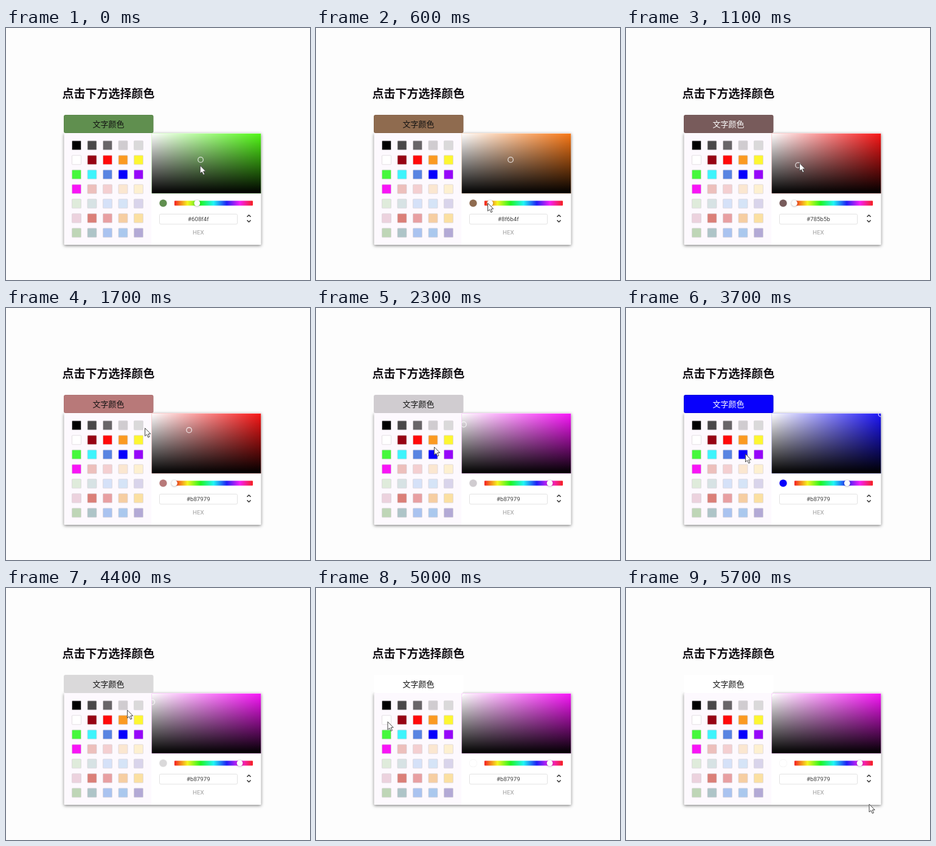
Recreate the animation shown at these times as an HTML page with a canvas. Size 500 by 415 pixels, loop 5800 ms.

```html
<!DOCTYPE html>
<html lang="zh-CN">
<head>
<meta charset="utf-8">
<style>
html, body { margin: 0; width: 100%; height: 100%; overflow: hidden; background: #fdfdfd; }
canvas { display: block; }
</style>
</head>
<body>
<canvas id="stage" width="500" height="415"></canvas>
<script>
const ctx = document.getElementById('stage').getContext('2d');
const LOOP = 5800, STEP = 100, HOLD = 100, LEAD = 40;
const CJK = '"Noto Sans CJK SC", "Noto Sans CJK", sans-serif';
const LATIN = 'Roboto, "Liberation Sans", sans-serif';
const AREA = { x: 239.5, y: 173.5, w: 180, h: 99 };
const HUE = { x: 277, y: 288.5, w: 129, h: 8 };

const toHex = rgb => '#' + rgb.map(c => Math.round(c).toString(16).padStart(2, '0')).join('');
const toRgb = hex => [1, 3, 5].map(i => parseInt(hex.slice(i, i + 2), 16));
const lighten = hex => toHex(toRgb(hex).map(c => (c + 255) / 2));

// Greys have no hue of their own and fall back to magenta.
function toHsv(hex) {
  const [r, g, b] = toRgb(hex);
  const max = Math.max(r, g, b), d = max - Math.min(r, g, b);
  const sector = !d ? 5 : max === r ? (g - b) / d + 6 : max === g ? (b - r) / d + 2 : (r - g) / d + 4;
  return [sector % 6 * 60, max ? d / max : 0, max / 255];
}

function fromHsv([h, s, v]) {
  return toHex([5, 3, 1].map(n => {
    const k = (n + h / 60) % 6;
    return 255 * v * (1 - s * Math.max(0, Math.min(k, 4 - k, 1)));
  }));
}

// Greys, vivid hues, then the pastels twice: half faded and plain.
const greys = '#000000 #494749 #696569 #d0ccd0 #dad9da #ffffff'.split(' ');
const vivid = '#960414 #ff0a0a #fb9a22 #fdf632 #46f83c #3ef4fc #5a84e2 #0800fc #9604fa #f814f6'.split(' ');
const pastel = '#db7f78 #e89fa2 #f6cea2 #fbe0a2 #bfd6b7 #aec4c8 #aac3f0 #aac8ee #b3a9d6 #d9a4bc'.split(' ');
const swatches = [...greys, ...vivid, ...pastel.map(lighten), ...pastel.slice(0, 9)];

const cell = i => [116 + i % 5 * 25.5, 193.3 + Math.floor(i / 5) * 24];
const spot = ([, s, v]) => [AREA.x + s * AREA.w, AREA.y + (1 - v) * AREA.h];
const thumb = ([h]) => [HUE.x + h / 360 * HUE.w, HUE.y];

const [green, brown, rose] = ['#608f4f', '#785b5b', '#b87979'].map(toHsv);
const dull = [0, green[1], green[2]];
const drags = [[0, ...green], [300, ...green], [700, ...dull], [900, ...dull], [1100, ...brown], [1400, ...rose]];

// Swatches visited: time, index, clicked
const visits = [
  [1900, 3, true], [2500, 13, false], [2800, 7, true], [3050, 6, false],
  [3600, 13, true], [4200, 4, true], [5000, 5, true]
];

const path = [
  [0, ...spot(green)], [300, ...thumb(green)], [700, ...thumb(dull)],
  [900, ...spot(dull)], [1100, ...spot(brown)], [1400, ...spot(rose)],
  ...visits.flatMap(([t, i]) => {
    const [x, y] = cell(i);
    return [[t, x + 2, y + 3], [t + HOLD, x + 2, y + 3]];
  }),
  [5700, 400, 356]
];

function track(keys, t) {
  const i = keys.findIndex(k => k[0] > t);
  if (i < 0) return keys[keys.length - 1].slice(1);
  const a = keys[i - 1], b = keys[i], u = (t - a[0]) / (b[0] - a[0]);
  return a.slice(1).map((v, n) => v + (b[n + 1] - v) * u);
}

function text(str, x, y, font, color, align = 'center') {
  ctx.font = font;
  ctx.fillStyle = color;
  ctx.textAlign = align;
  ctx.fillText(str, x, y);
}

function box(x, y, w, h, r, fill, stroke) {
  ctx.beginPath();
  ctx.roundRect(x, y, w, h, r);
  if (fill) { ctx.fillStyle = fill; ctx.fill(); }
  if (stroke) { ctx.strokeStyle = stroke; ctx.lineWidth = 1; ctx.stroke(); }
}

function disc(x, y, r, fill) {
  ctx.beginPath();
  ctx.arc(x, y, r, 0, Math.PI * 2);
  ctx.fillStyle = fill;
  ctx.fill();
}

function shadow(blur, dy, alpha, draw) {
  ctx.save();
  ctx.shadowColor = `rgba(0,0,0,${alpha})`;
  ctx.shadowBlur = blur;
  ctx.shadowOffsetY = dy;
  draw();
  ctx.restore();
}

function ramp(x0, y0, x1, y1, colors) {
  const g = ctx.createLinearGradient(x0, y0, x1, y1);
  colors.forEach((c, i) => g.addColorStop(i / (colors.length - 1), c));
  return g;
}

function button(color, sat) {
  const [r, g, b] = toRgb(color);
  const light = .299 * r + .587 * g + .114 * b > 110;
  box(95, 143, 147.5, 30, 3, color);
  box(95.5, 143.5, 146.5, 29, 3, null, `rgba(0,0,0,${.15 * sat})`);
  text('文字颜色', 168.5, 162.5, '13px ' + CJK, light ? '#111' : '#fff');
}

function panel() {
  shadow(5, 1.5, .5, () => box(95.5, 173, 324, 184, 1, '#fff'));
  ctx.fillStyle = '#fdf9fe';
  ctx.fillRect(96, 173, 143, 184);
  swatches.forEach((color, i) => {
    const [x, y] = cell(i);
    box(x - 7.5, y - 7.5, 15, 15, 1, color, 'rgba(215,210,215,.7)');
  });
}

function area(hsv) {
  const { x, y, w, h } = AREA;
  ctx.save();
  ctx.beginPath();
  ctx.rect(x, y, w, h);
  ctx.clip();
  const fills = [
    fromHsv([hsv[0], .92, .97]),
    ramp(x, 0, x + w, 0, ['rgba(255,255,255,1)', 'rgba(255,255,255,0)']),
    ramp(0, y, 0, y + h, ['rgba(0,0,0,0)', 'rgba(0,0,0,1)'])
  ];
  for (const f of fills) {
    ctx.fillStyle = f;
    ctx.fillRect(x, y, w, h);
  }
  ctx.beginPath();
  ctx.arc(...spot(hsv), 4.3, 0, Math.PI * 2);
  ctx.strokeStyle = 'rgba(255,255,255,.75)';
  ctx.lineWidth = 1.3;
  ctx.stroke();
  ctx.restore();
}

function chevron(y, d) {
  ctx.beginPath();
  ctx.moveTo(396.5, y);
  ctx.lineTo(399.5, y + d);
  ctx.lineTo(402.5, y);
  ctx.strokeStyle = '#333';
  ctx.lineWidth = 1.5;
  ctx.stroke();
}

function controls(hsv, color, label) {
  disc(258.5, 288.5, 6.6, 'rgba(0,0,0,.06)');
  disc(258.5, 288.5, 6.1, color);
  const hues = [0, 1, 2, 3, 4, 5, 6].map(i => fromHsv([i * 60, .87, .96]));
  box(HUE.x, HUE.y - HUE.h / 2, HUE.w, HUE.h, 1, ramp(HUE.x, 0, HUE.x + HUE.w, 0, hues));
  shadow(3, .5, .35, () => disc(...thumb(hsv), 4.9, '#fcfcfc'));
  box(252.5, 306.5, 128, 16.5, 2, '#fff', '#e2e2e2');
  text(label, 316.3, 318, '9.7px ' + LATIN, '#444');
  text('HEX', 316.3, 340.2, '9.7px ' + LATIN, '#a0a0a0');
  chevron(311, -3);
  chevron(316.5, 3);
}

function pointer([x, y]) {
  ctx.beginPath();
  [[0, 0], [0, 13], [3, 10.4], [5.2, 15.2], [7.4, 14.2], [5.2, 9.6], [9.2, 9.4]]
    .forEach(([dx, dy]) => ctx.lineTo(x + dx, y + dy));
  ctx.closePath();
  ctx.fillStyle = '#fff';
  ctx.fill();
  ctx.strokeStyle = '#444';
  ctx.lineWidth = 1;
  ctx.lineJoin = 'round';
  ctx.stroke();
}

function draw(t) {
  const dragged = track(drags, t);
  const pick = visits.filter(([at, , clicked]) => clicked && at <= t).pop();
  const hsv = pick ? toHsv(swatches[pick[1]]) : dragged;
  const color = fromHsv(hsv);
  ctx.fillStyle = '#fdfdfd';
  ctx.fillRect(0, 0, 500, 415);
  text('点击下方选择颜色', 92.4, 114.8, 'bold 19px ' + CJK, '#0e0a10', 'left');
  panel();
  button(color, hsv[1]);
  area(hsv);
  controls(hsv, color, fromHsv(dragged));
  // The pointer runs slightly ahead of the colour it drags.
  pointer(track(path, t + LEAD));
}

const start = performance.now();
function frame() {
  const t = (performance.now() - start) % LOOP;
  draw(Math.floor(t / STEP) * STEP);
  requestAnimationFrame(frame);
}
frame();
</script>
</body>
</html>
```
